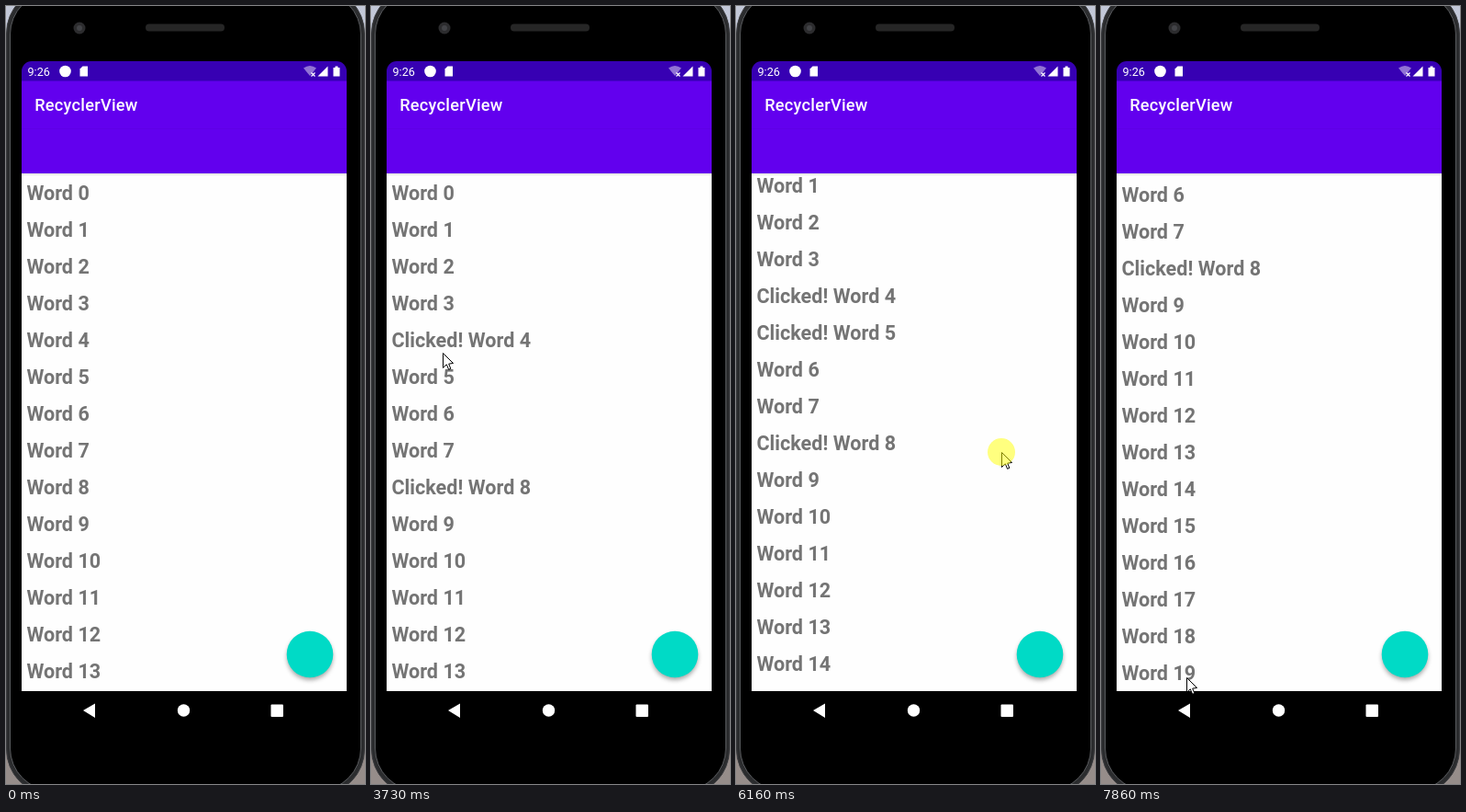
Write an HTML page that moves like this. It is 391 px wide and 846 px high and loops after 8 s.

```html
<!DOCTYPE html>
<html lang="en">
<head>
<meta charset="utf-8">
<title>Word list</title>
<style>
  html, body { margin: 0; width: 100%; height: 100%; overflow: hidden; background: #c3c8d8; }
  svg { display: block; font-family: Roboto, "Liberation Sans", sans-serif; }
  #stage { width: 100vw; height: 100vh; }
  #rows { font-size: 21.6px; font-weight: 700; fill: #747474; }
</style>
</head>
<body>
<svg id="stage" viewBox="0 0 391 846">
  <defs>
    <linearGradient id="drop" x2="0" y2="1">
      <stop stop-opacity=".13"/><stop offset="1" stop-opacity="0"/>
    </linearGradient>
    <filter id="blur" x="-30%" y="-30%" width="160%" height="160%"><feGaussianBlur stdDeviation="2.5"/></filter>
  </defs>

  <!-- phone -->
  <rect y="780" width="391" height="66" fill="#968d8a"/>
  <rect x=".5" y="-20" width="390" height="878" rx="50" fill="#2b2c2e" stroke="#3d3e41"/>
  <rect x="4.500" y="-15" width="382" height="868" rx="46" stroke="#5a5c5f"/>
  <rect x="8" y="-12" width="375" height="862" rx="43"/>
  <rect x="152" y="19.500" width="86" height="8" rx="4" fill="#262626"/>
  <circle cx="80" cy="24" r="6.500" fill="#2c2c2e"/>
  <circle cx="80" cy="24" r="3" fill="#424347"/>

  <!-- app -->
  <path d="M17 182V71a11 11 0 0 1 11-11H360a11 11 0 0 1 11 11V182Z" fill="#3700b3"/>
  <path d="M17 81.500H371V182H17Z" fill="#6200ee"/>
  <path d="M17 133.500H371" stroke="#5e00e5"/>
  <rect x="17" y="182" width="354" height="563" fill="#fefefe"/>
  <svg x="17" y="182" width="354" height="563"><g id="rows"></g></svg>
  <rect x="17" y="182" width="354" height="3" fill="url(#drop)"/>
  <g fill="#fff">
    <text x="31.200" y="114" font-size="18.200" font-weight="500" letter-spacing=".25">RecyclerView</text>
    <text x="23.500" y="75.500" font-size="12.600">9:26</text>
    <circle cx="64.500" cy="71" r="6.300"/>
    <path d="M83.500 65.500H89V76.500H80.500V68.500Z"/>
    <path d="M324 67.500q7-5 14 0L331 76Z" opacity=".45"/>
    <path d="M332.500 72.500l4 4m0-4l-4 4" stroke="#fff" stroke-width="1.200"/>
    <path d="M339.500 76.500L350.500 65.500V76.500Z"/>
    <path d="M356.500 67H358.500V65.500H361.500V67H363.500V76.500H356.500Z"/>
    <path d="M84 766L97 758.500V774Z"/>
    <circle cx="193.500" cy="766" r="6.700"/>
    <rect x="288.500" y="759.500" width="13.500" height="13.500" rx="1"/>
  </g>
  <circle cx="331" cy="708" r="25" opacity=".35" filter="url(#blur)"/>
  <circle cx="331" cy="705" r="25.300" fill="#00dac6"/>

  <g id="mouse">
    <path d="M.5.5V16.500L4.300 12.800L6.600 18.300L8.800 17.400L6.700 12.100L11.500 11.500Z" fill="#fff" stroke="#000"/>
    <circle id="press" r="15" fill="#ff0" opacity=".5"/>
  </g>
</svg>
<script>
const LOOP = 8000, ROW = 40;
const APPEAR = 810, SCROLL_END = 6610;
const $ = id => document.getElementById(id);

// start, end, x, y, sideways bow
const moves = [
  [810, 1570, 74, 521],
  [1600, 1650, 72, 524],
  [2500, 2770, 81, 366],
  [2800, 2970, 80, 367],
  [3600, 3950, 71, 425],
  [3950, 4200, 78, 395],
  [4680, 5370, 292, 564],
  [5400, 5600, 292, 557],
  [5897, 6623, 282, 290],
  [6620, 7070, 99, 711, 130],
  [7180, 7560, 142, 656],
  [7560, 7850, 92, 731]
];
// press, release, row
const taps = [[1800, 2030, 8], [3120, 3350, 4], [4430, 4610, 5], [5610, 6690]];

const rows = Array.from({ length: 21 }, (_, i) => {
  const row = document.createElementNS("http://www.w3.org/2000/svg", "text");
  row.setAttribute("x", 5.4);
  row.setAttribute("y", 29 + i * ROW);
  return $("rows").appendChild(row);
});

function smooth(t, start, end) {
  const p = Math.min(1, Math.max(0, (t - start) / (end - start)));
  return p * p * (3 - 2 * p);
}

// Motion is sampled at about 13 steps a second, like a screen recording.
const sample = t => Math.floor((t - 17) / 76.6) * 76.6 + 17;

function pointer(t) {
  let x = 11, y = 550;
  for (const [start, end, toX, toY, bow = 0] of moves) {
    const p = smooth(t, start, end);
    x += (toX - x) * p + bow * Math.sin(Math.PI * p);
    y += (toY - y) * p;
  }
  return [x, y].map(Math.round);
}

function draw(t) {
  const now = sample(t);
  $("mouse").style.display = t < APPEAR ? "none" : "";
  $("mouse").setAttribute("transform", `translate(${pointer(now)})`);
  $("press").style.display = taps.some(([on, off]) => t >= on && t < off) ? "" : "none";

  const scroll = Math.round(242 * smooth(Math.min(now, SCROLL_END), 5938, 6663));
  $("rows").setAttribute("transform", `translate(0 ${-scroll})`);
  rows.forEach((row, i) => {
    const clicked = taps.some(([, off, n]) => n === i && t >= off + 50);
    const label = (clicked ? "Clicked! " : "") + "Word " + i;
    if (row.textContent !== label) row.textContent = label;
  });
}

const began = performance.now();
function tick() {
  draw((performance.now() - began) % LOOP);
  requestAnimationFrame(tick);
}
tick();
</script>
</body>
</html>
```
